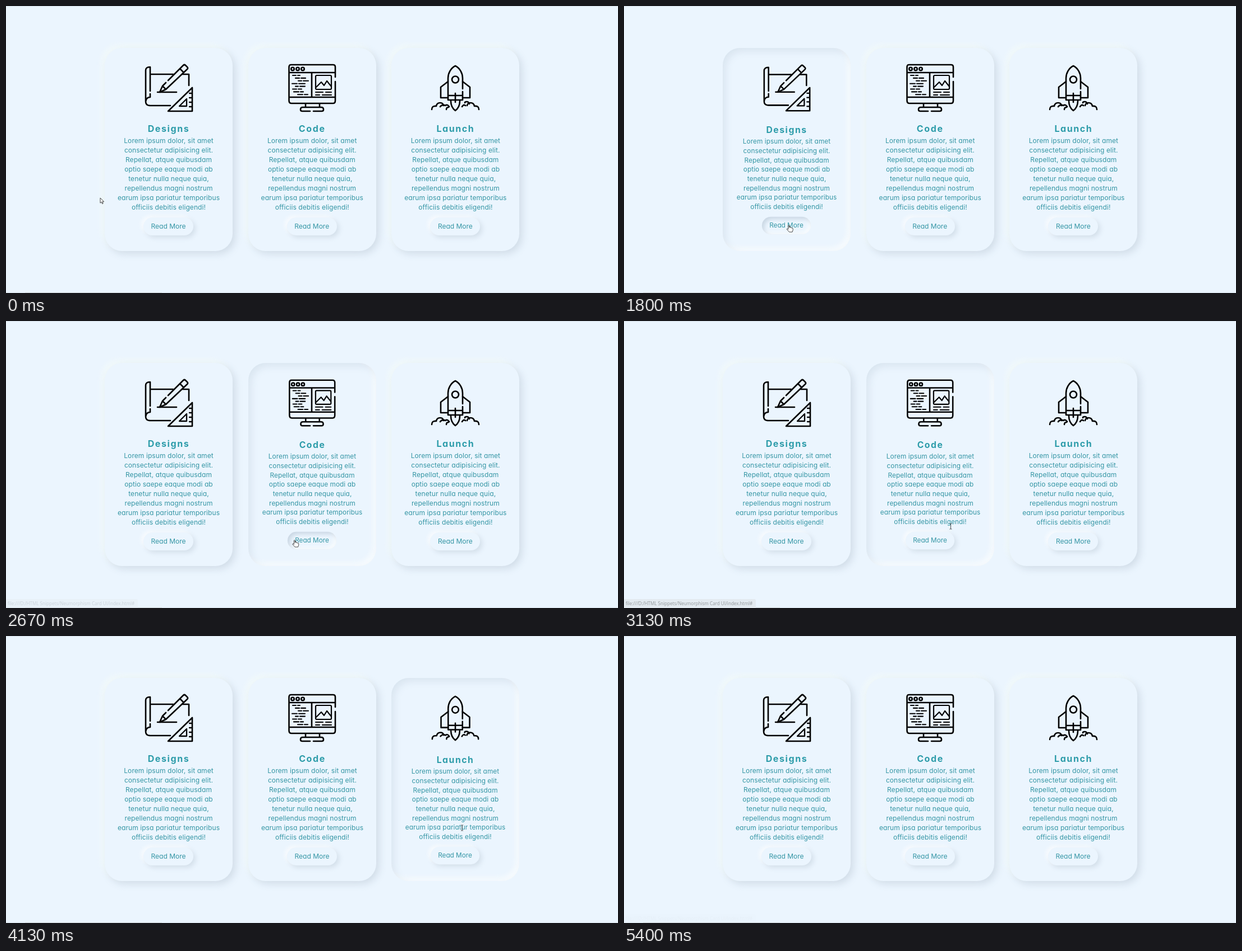
Animation of 1091x513 px, one loop 6.27 s. Source, as an HTML page:

```html
<!DOCTYPE html>
<html lang="en">
<head>
<meta charset="utf-8">
<title>Neumorphism cards</title>
<style>
  html, body { margin: 0; width: 100%; height: 100%; overflow: hidden; background: #ebf5fe; }
  #stage { position: relative; width: 1091px; height: 513px; overflow: hidden; background: #ebf5fe;
    font: 12px/17.05px Inter, "Open Sans", sans-serif; font-feature-settings: "cv11"; color: #3596a5; }
  #stage div, #stage svg { position: absolute; }
  .edge { left: 0; width: 1091px; height: 1px; background: #d9e3eb; }
  .card { top: 75px; width: 228px; height: 363px; border-radius: 31px;
    box-shadow: 5px 5px 13px rgba(130, 148, 165, .24), -5px -5px 12px rgba(246, 252, 250, .75); }
  .card.on { box-shadow: inset 5px 6px 13px rgba(130, 148, 165, .16), inset -6px -6px 10px rgba(250, 252, 254, .8); }
  .icon { left: 70px; top: 27px; width: 88px; height: 88px; fill: none; stroke: #000;
    stroke-width: 2.6; stroke-linecap: round; stroke-linejoin: round; }
  .body { left: 0; top: 0; width: 228px; height: 363px; transform-origin: 114px 244px;
    text-align: center; white-space: nowrap; }
  .title { top: 134px; width: 100%; height: 20px; font-weight: 700; font-size: 16px; line-height: 20px;
    letter-spacing: 1.6px; color: #2d9caa; }
  .copy { top: 156.6px; width: 100%; letter-spacing: .08px; }
  .button { left: 69px; top: 303px; width: 89px; height: 32px; border-radius: 16px; line-height: 32px;
    box-shadow: 4px 4px 9px rgba(130, 148, 165, .22), -4px -3px 7px rgba(250, 252, 254, .9); }
  .button.on { box-shadow: inset 4px 4px 8px rgba(120, 140, 160, .28), inset -4px -4px 7px rgba(250, 252, 254, .8); }
  #status { left: 0; top: 497px; width: 235px; height: 16px; border-radius: 0 3px 0 0; background: #e3eaf0;
    color: #92979b; font: 8.1px/16px "Open Sans", sans-serif; text-indent: 3px; white-space: nowrap; }
  #cursor { left: 0; top: 0; width: 20px; height: 24px; overflow: visible; }
  #cursor path { fill: #fff; stroke: #333; stroke-width: .9; stroke-linejoin: round; }
</style>
</head>
<body>
<div id="stage">
  <div class="edge" style="top:0"></div>
  <div class="edge" style="top:512px"></div>
  <div class="edge" style="top:512px;left:34px;width:244px;background:#c9cfd4"></div>
  <div id="status">file:///D:/HTML Snippets/Neumorphism Card UI/index.html#</div>
  <svg id="cursor">
    <path data-kind="arrow" d="M0 0V9.2L2.2 7.3L3.6 10.6L5.1 10L3.7 6.8H6.6Z"/>
    <path data-kind="hand" d="M.2 1.2Q1.1-.2 2 1.2V5Q3-.1 3.8 5.2Q4.9 4 5.5 5.6Q7 4.6 7.2 6.4Q8.7 6 8.5 7.6V9.5L7.3 13H2L-2.4 8.2Q-2.2 6.6-1 7.2L.2 8.3Z"/>
    <path data-kind="text" d="M-2-5H-.5L0-4.5L.5-5H2M0-4.5V4.5M-2 5H-.5L0 4.5L.5 5H2" style="fill:none"/>
  </svg>
</div>
<script>
const LOOP = 6270;
const stage = document.getElementById('stage');
const statusBar = document.getElementById('status');
const cursor = document.getElementById('cursor');
const pointers = [...cursor.children];

const path = (d, extra = '') => `<path d="${d}" ${extra}/>`;
const circle = (x, y, r) => `<circle cx="${x}" cy="${y}" r="${r}"/>`;

// Rows of code: dash starts and lengths, indented in a stepped pattern.
const codeRows = [[9, 6, 18, 4], [14, 7, 24, 8], [19, 6, 28, 9], [8, 9, 20, 11],
                  [14, 5, 22, 9], [9, 7, 19, 6], [11, 9, 23, 5], [18, 9, 30, 6]]
  .map(([a, la, b, lb], i) => `M${a} ${22 + i * 4.9}h${la}M${b} ${22 + i * 4.9}h${lb}`).join('');

const icons = {
  Designs:
    path('M11 7Q3 7 3 13V69Q3 76 11 76H47M3 69Q4 61 11 61V55M11 50V7M11 20H52M69 20H80V40M24 52H58') +
    path('M28 52L33 41L39 47ZM33 41L39 35M43 31L70 4Q72 2 74 4L77 7Q79 9 77 11L39 47M64 10L70 16') +
    path('M43 86L86 44V86Z', 'fill="#ebf5fe"') +
    path('M63 77H76V64ZM81 54h4M81 62h4M81 70h4M81 78h4', 'stroke-width="2.3"'),
  Code:
    path('M85 25V7Q85 3 81 3H6Q2.5 3 2.5 7V67Q2.5 72 7 72H81Q85 72 85 67V33M2.5 17H85M43 17V61M2.5 61H85') +
    [9, 18, 27].map(x => circle(x, 10.5, 2.7)).join('') +
    path('M52 22H76Q78 22 78 24V45Q78 47 76 47H52Q50 47 50 45V24Q50 22 52 22ZM51 43L60 34L65 40L70 32L78 42', 'stroke-width="2.2"') +
    path(codeRows + 'M50 52h13M68 52h10M50 57h7M62 57h16', 'stroke-width="2.1"') +
    path('M32 73V79M57 73V79M40 86H26Q23 86 23 83Q23 79 27 79H60Q64 79 64 83Q64 86 61 86H46'),
  Launch:
    path('M57 46V27C57 18 52 9 44 5C36 9 31 18 31 27V66H57V51M31 58H57M44 54V70') +
    circle(44, 29.5, 6) +
    path('M31 33L18 43V62H31M57 33L70 43V62H57M36 68C36 78 40 82 44 85C48 82 52 78 52 68') +
    path('M2 83Q2 76 10 77Q11 71 17 71Q22 71 23 76M17 78Q21 73 26 76Q30 73 33 78M28 83Q28 79 32 79' +
         'M86 83Q86 76 78 77Q77 71 71 71Q66 71 65 76M61 71Q61 69 64 69Q68 69 69 73M56 78Q59 73 62 76'),
};

const copy = ['Lorem ipsum dolor, sit amet', 'consectetur adipisicing elit.', 'Repellat, atque quibusdam',
  'optio saepe eaque modi ab', 'tenetur nulla neque quia,', 'repellendus magni nostrum',
  'earum ipsa pariatur temporibus', 'officiis debitis eligendi!'].join('<br>');

// Spans of time in which the pointer is over each card and its button.
const hovers = [
  { card: [170, 2170], buttons: [[1560, 2070]] },
  { card: [2230, 3270], buttons: [[2450, 3130]] },
  { card: [3500, 4960], buttons: [[3750, 4000], [4500, 4870]] },
];

const cards = Object.entries(icons).map(([title, art], i) => {
  const el = document.createElement('div');
  el.className = 'card';
  el.style.left = 176 + i * 255.7 + 'px';
  el.innerHTML = `<svg class="icon" viewBox="0 0 88 88">${art}</svg>
    <div class="body"><div class="title">${title}</div><div class="copy">${copy}</div>
    <div class="button">Read More</div></div>`;
  stage.insertBefore(el, statusBar);
  const find = name => el.querySelector(name);
  return { el, icon: find('.icon'), body: find('.body'), button: find('.button'), ...hovers[i] };
});

// Pointer route: time, x, y.
const route = [
  [0, 168, 343], [70, 169, 342], [330, 225, 325], [530, 251, 313], [670, 251, 313],
  [760, 247, 311], [1000, 330, 305], [1200, 344, 309], [1330, 342, 312], [1560, 300, 384],
  [1700, 292, 391], [2000, 294, 391], [2170, 404, 396], [2480, 510, 391], [2670, 513, 391],
  [2960, 568, 385], [3130, 582, 367], [3270, 645, 362], [3470, 703, 360], [3650, 762, 378],
  [3800, 800, 391], [3930, 806, 389], [4130, 813, 343], [4270, 814, 340], [4400, 814, 341],
  [4600, 802, 391], [4800, 804, 393], [4960, 816, 438], [5140, 830, 520],
];
const statusFade = [
  [1840, 0], [1930, 1], [2200, 1], [2500, 0], [2600, 0], [2800, 1], [3530, 1], [3780, 0],
  [4800, 0], [4930, 1], [5120, 1], [5400, .06], [6270, .06],
];

const clamp = v => Math.min(1, Math.max(0, v));
const smooth = v => { v = clamp(v); return v * v * (3 - 2 * v); };
const within = (t, [a, b]) => t >= a && t < b;

function sample(keys, t) {
  if (t <= keys[0][0]) return keys[0].slice(1);
  const next = keys.findIndex(k => k[0] > t);
  if (next < 0) return keys[keys.length - 1].slice(1);
  const a = keys[next - 1], b = keys[next], u = (t - a[0]) / (b[0] - a[0]);
  return a.slice(1).map((v, i) => v + (b[i + 1] - v) * u);
}

function render(t) {
  const [x, y] = sample(route, t);
  let kind = 'arrow';
  cards.forEach((card, i) => {
    const [enter, leave] = card.card;
    const press = smooth((t - enter) / 200) - smooth((t - leave) / 200);
    const overButton = card.buttons.some(span => within(t, span));
    const localX = x - i * 255.7;
    card.el.classList.toggle('on', within(t, card.card));
    card.button.classList.toggle('on', overButton);
    card.icon.style.transform = card.body.style.transform = `scale(${1 - .02 * press})`;
    if (overButton) kind = 'hand';
    else if (localX > 199 && localX < 381 && y > 232 && y < 367) kind = 'text';
  });
  pointers.forEach(p => { p.style.display = p.dataset.kind === kind ? '' : 'none'; });
  cursor.style.display = t < 5140 ? '' : 'none';
  cursor.style.transform = `translate(${x}px, ${y}px)`;
  statusBar.style.opacity = sample(statusFade, t)[0];
}

const start = performance.now();
function tick() {
  render((performance.now() - start) % LOOP);
  requestAnimationFrame(tick);
}
tick();
</script>
</body>
</html>
```
